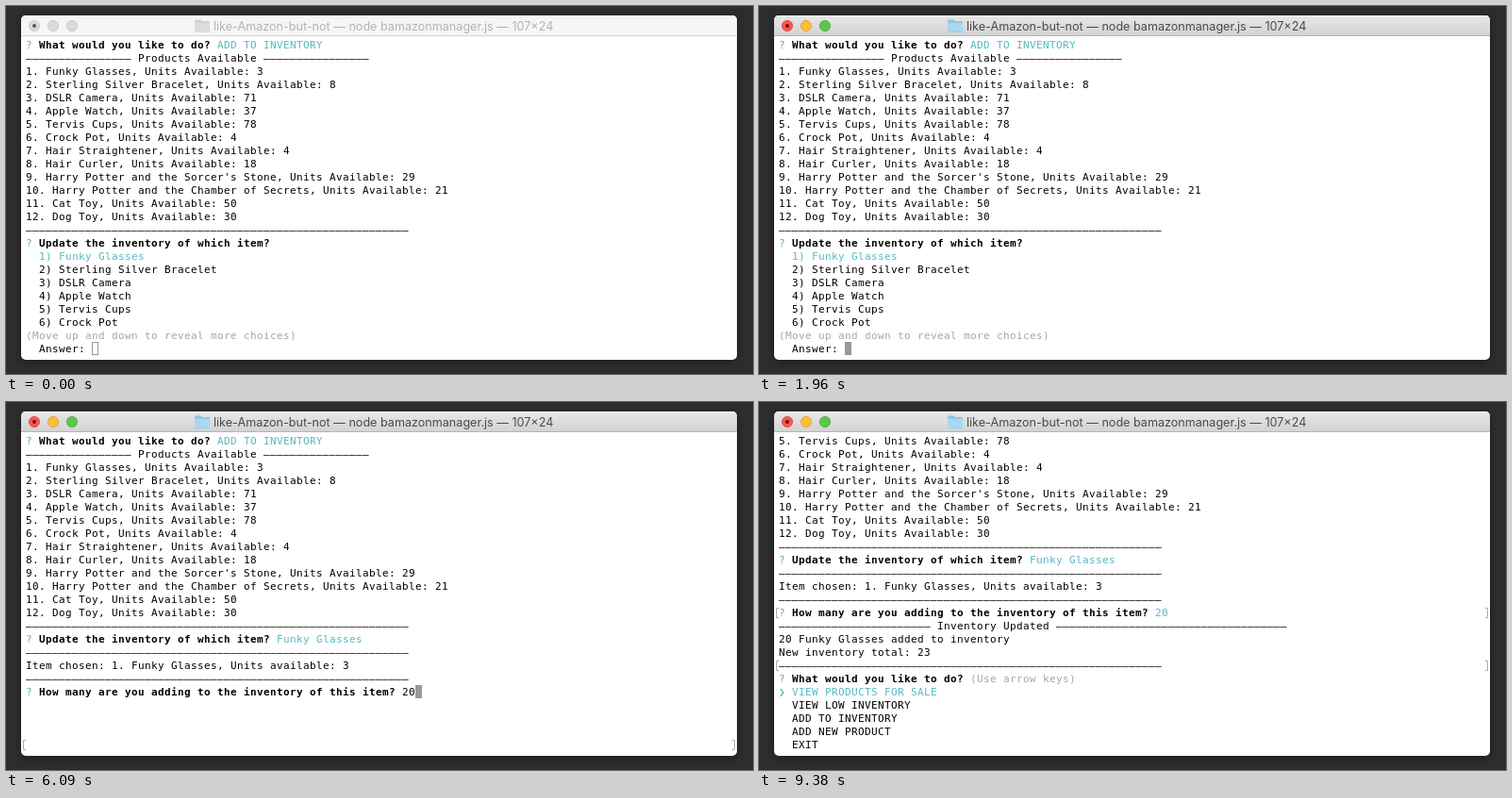
Write an HTML page with a canvas that moves like this. It is 792 by 390 pixels and loops after 9520 ms.

```html
<!DOCTYPE html>
<html lang="en">
<head>
<meta charset="utf-8">
<title>Terminal</title>
<style>
  html, body { margin: 0; width: 100%; height: 100%; overflow: hidden; background: #2d2d2d; }
  canvas { display: block; width: 792px; height: 390px; }
</style>
</head>
<body>
<canvas id="stage" width="792" height="390"></canvas>
<script>
const ctx = document.getElementById('stage').getContext('2d');
const LOOP = 9520;
const CELL = 7, LINE = 14, LEFT = 21, TOP = 34;
const MONO = '11px "DejaVu Sans Mono", monospace';
const SANS = '12.6px Inter, sans-serif';
const WIN = { x: 16, y: 10, w: 759, h: 365, r: 5, bar: 22 };
const INK = { k: '#000', b: '#000', g: '#63b76c', c: '#55b9c3', d: '#a6a6a6' };

const dashes = n => '–'.repeat(n);
const rule = dashes(58);
const products = [
  ['Funky Glasses', 3], ['Sterling Silver Bracelet', 8], ['DSLR Camera', 71],
  ['Apple Watch', 37], ['Tervis Cups', 78], ['Crock Pot', 4],
  ['Hair Straightener', 4], ['Hair Curler', 18],
  ["Harry Potter and the Sorcer's Stone", 29],
  ['Harry Potter and the Chamber of Secrets', 21],
  ['Cat Toy', 50], ['Dog Toy', 30]
];

// "~x" switches the style of the text that follows
const ask = (question, rest = '') => `~g? ~b${question} ${rest}`;
const which = 'Update the inventory of which item?';
const howMany = 'How many are you adding to the inventory of this item?';

const listing = [
  ask('What would you like to do?', '~cADD TO INVENTORY'),
  `${dashes(16)} Products Available ${dashes(16)}`,
  ...products.map(([name, units], i) => `${i + 1}. ${name}, Units Available: ${units}`),
  rule
];
const choosing = [
  ...listing,
  ask(which),
  ...products.slice(0, 6).map(([name], i) => `${i ? '' : '~c'}  ${i + 1}) ${name}`),
  '~d(Move up and down to reveal more choices)',
  '  Answer: '
];
const chosen = [
  ...listing,
  ask(which, '~cFunky Glasses'),
  rule,
  'Item chosen: 1. Funky Glasses, Units available: 3',
  rule
];
const answered = [...chosen, ask(howMany, '~c20')];
const updated = [
  ...answered,
  `${dashes(23)} Inventory Updated ${dashes(35)}`,
  '20 Funky Glasses added to inventory',
  'New inventory total: 23',
  rule,
  ask('What would you like to do?', '~d(Use arrow keys)'),
  '~c❯ VIEW PRODUCTS FOR SALE',
  '  VIEW LOW INVENTORY',
  '  ADD TO INVENTORY',
  '  ADD NEW PRODUCT',
  '  EXIT'
].slice(6);

// cursor is [column, row]; marks are the bracketed rows
const scenes = [
  { at: 0, lines: choosing, cursor: [10, 23], hollow: true, marks: [], idle: true },
  { at: 420, lines: choosing, cursor: [10, 23], hollow: true, marks: [] },
  { at: 490, lines: choosing, cursor: [10, 23], marks: [] },
  { at: 3220, lines: [...chosen, ask(howMany)], cursor: [57, 19], marks: [23] },
  { at: 6090, lines: [...chosen, ask(howMany, '~k20')], cursor: [59, 19], marks: [23] },
  { at: 7070, lines: answered, cursor: [0, 20], marks: [19, 23] },
  { at: 7420, lines: updated, marks: [13, 17] }
];

function drawLine(line, row) {
  let col = 0;
  line.split(/(~[kbgcd])/).reduce((style, part) => {
    if (/^~[kbgcd]$/.test(part)) return part[1];
    ctx.font = (style === 'b' ? 'bold ' : '') + MONO;
    ctx.fillStyle = INK[style];
    for (const ch of part) {
      if (ch !== ' ') ctx.fillText(ch, LEFT + col * CELL, TOP + row * LINE + 11);
      col++;
    }
    return style;
  }, 'k');
}

function drawCursor([col, row], hollow) {
  const x = LEFT + col * CELL, y = TOP + row * LINE;
  ctx.fillStyle = ctx.strokeStyle = '#999';
  ctx.lineWidth = 1;
  if (hollow) ctx.strokeRect(x + 0.5, y + 0.5, CELL - 1, LINE - 1);
  else ctx.fillRect(x, y, CELL, LINE);
}

function drawMark(row) {
  const y = TOP + row * LINE + 2.5;
  ctx.strokeStyle = '#aaa';
  ctx.lineWidth = 1;
  ctx.beginPath();
  for (const [edge, dir] of [[18.5, 1], [772.5, -1]]) {
    ctx.moveTo(edge + dir * 2.5, y);
    ctx.lineTo(edge, y);
    ctx.lineTo(edge, y + 10);
    ctx.lineTo(edge + dir * 2.5, y + 10);
  }
  ctx.stroke();
}

function disc(x, y, r, fill, edge) {
  ctx.beginPath();
  ctx.arc(x, y, r, 0, Math.PI * 2);
  ctx.fillStyle = fill;
  ctx.fill();
  if (!edge) return;
  ctx.strokeStyle = edge;
  ctx.lineWidth = 0.8;
  ctx.stroke();
}

function drawFolder(idle) {
  ctx.fillStyle = idle ? '#d2d2d2' : '#8fc6e6';
  ctx.beginPath();
  ctx.roundRect(200, 14.5, 7.5, 5, 1);
  ctx.roundRect(200, 16, 16, 12, 1);
  ctx.fill();
  ctx.fillStyle = idle ? '#dcdcdc' : '#a9d8f2';
  ctx.fillRect(200, 18, 16, 9.5);
}

function drawBar(idle) {
  const { x, y, w, bar } = WIN;
  const shade = ctx.createLinearGradient(0, y, 0, y + bar);
  shade.addColorStop(0, idle ? '#f6f6f6' : '#e8e8e8');
  shade.addColorStop(1, idle ? '#f6f6f6' : '#d2d2d2');
  ctx.fillStyle = shade;
  ctx.fillRect(x, y, w, bar);
  ctx.fillStyle = idle ? '#fbfbfb' : '#f3f3f3';
  ctx.fillRect(x, y, w, 1);
  ctx.fillStyle = idle ? '#d4d4d4' : '#b5b5b5';
  ctx.fillRect(x, y + bar - 1, w, 1);

  const lights = [['#f9564f', '#d8453e'], ['#f8bd3c', '#dca02f'], ['#5ac84b', '#46a93a']];
  lights.forEach(([fill, edge], i) =>
    disc(30 + i * 20, 21, 5.6, idle ? '#dadada' : fill, idle ? '#c4c4c4' : edge));
  disc(30, 21, 2, idle ? '#555' : '#6e100c');

  drawFolder(idle);
  ctx.font = SANS;
  ctx.fillStyle = idle ? '#b3b3b3' : '#4a4a4a';
  ctx.fillText('like-Amazon-but-not — node bamazonmanager.js — 107×24', 220, 26);
}

function drawWindow({ lines, cursor, hollow, marks, idle }) {
  const { x, y, w, h, r } = WIN;
  ctx.fillStyle = '#2d2d2d';
  ctx.fillRect(0, 0, 792, 390);
  ctx.save();
  ctx.beginPath();
  ctx.roundRect(x, y, w, h, r);
  ctx.shadowColor = 'rgba(0,0,0,0.35)';
  ctx.shadowBlur = 8;
  ctx.shadowOffsetY = 2;
  ctx.fillStyle = '#fff';
  ctx.fill();
  ctx.shadowColor = 'transparent';
  ctx.clip();
  drawBar(idle);
  marks.forEach(drawMark);
  if (cursor) drawCursor(cursor, hollow);
  lines.forEach(drawLine);
  ctx.restore();
}

const start = performance.now();
function tick() {
  const t = (performance.now() - start) % LOOP;
  drawWindow(scenes.findLast(s => s.at <= t));
  requestAnimationFrame(tick);
}
tick();
</script>
</body>
</html>
```
